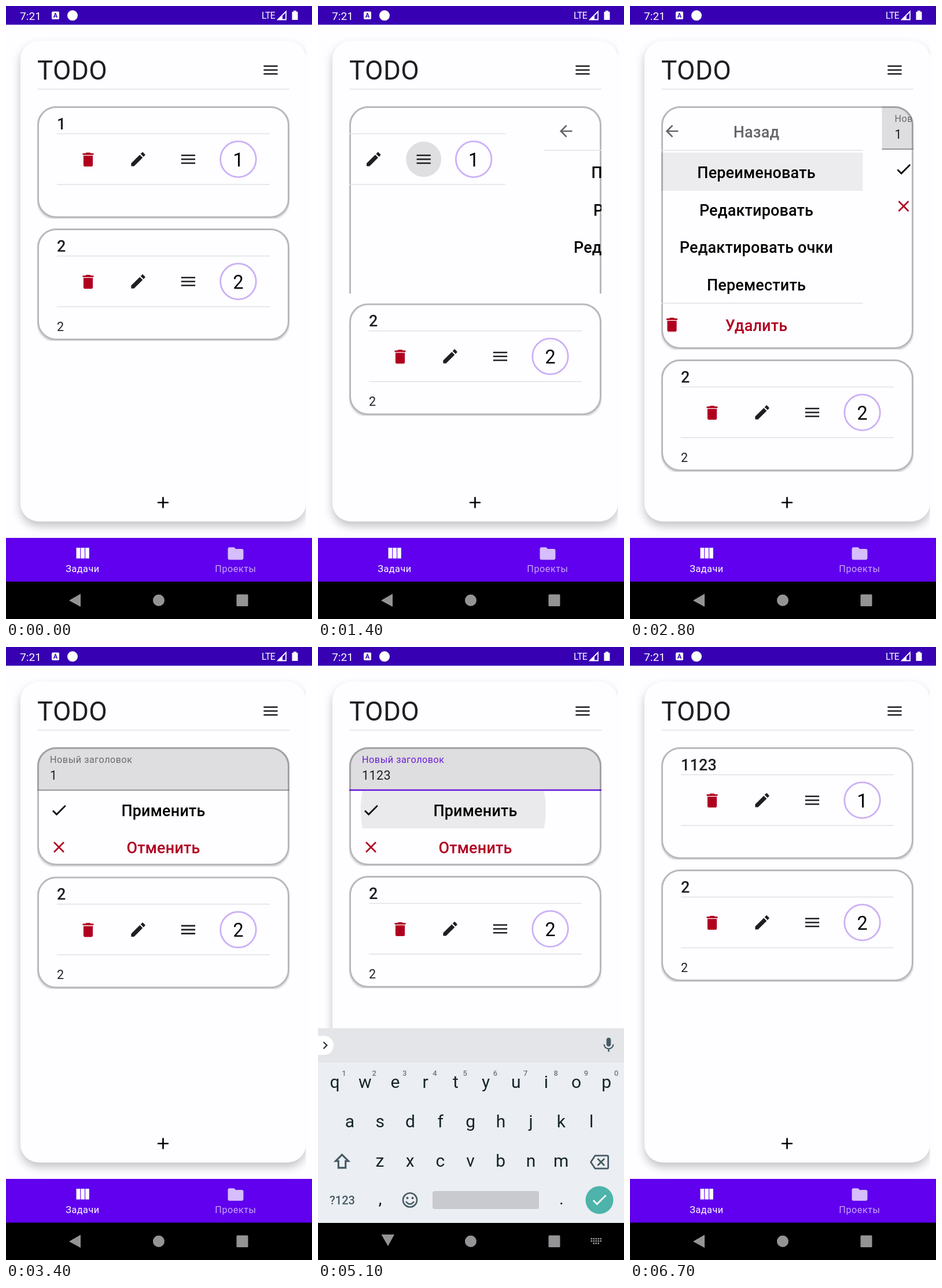
These frames come from a looping animation (529x1058 px, 6800 ms). An HTML page:

```html
<!DOCTYPE html>
<html lang="ru">
<head>
<meta charset="utf-8">
<title>TODO</title>
<style>
html, body { margin: 0; width: 100%; height: 100%; overflow: hidden; background: #fefdff; }
svg { display: block; width: 100vw; height: 100vh; font-family: Roboto, sans-serif; }
.mid { text-anchor: middle; }
.btn { font-size: 26.9px; font-weight: 500; letter-spacing: .2px; text-anchor: middle; }
.ink { fill: #1f1e20; }
.red { fill: #b00020; }
.line { stroke: #e1e0e3; stroke-width: 1.5; }
</style>
</head>
<body>
<svg id="stage" viewBox="0 0 529 1058"></svg>
<script>
const PAGE = 435, MAIN = 193, MENU = 419, EDIT = 204;
const OPEN = 1318, RENAME = 2743, FOCUS = 3750, APPLY = 5630, SLIDE = 300, LOOP = 6800;
const TYPED = [4400, 4500, 4590];

const ICONS = {
  trash: 'M6 19c0 1.1.9 2 2 2h8c1.1 0 2-.9 2-2V7H6v12zM19 4h-3.5l-1-1h-5l-1 1H5v2h14V4z',
  pen: 'M3 17.25V21h3.75L17.81 9.94l-3.75-3.75L3 17.25zM20.71 7.04c.39-.39.39-1.02 0-1.41l-2.34-2.34c-.39-.39-1.02-.39-1.41 0l-1.83 1.83 3.75 3.75 1.83-1.83z',
  menu: 'M3 18h18v-2H3v2zm0-5h18v-2H3v2zm0-7v2h18V6H3z',
  plus: 'M19 13h-6v6h-2v-6H5v-2h6V5h2v6h6v2z',
  back: 'M20 11H7.83l5.59-5.59L12 4l-8 8 8 8 1.41-1.41L7.83 13H20v-2z',
  check: 'M9 16.17L4.83 12l-1.42 1.41L9 19 21 7l-1.41-1.41z',
  cross: 'M19 6.41L17.59 5 12 10.59 6.41 5 5 6.41 10.59 12 5 17.59 6.41 19 12 13.41 17.59 19 19 17.59 13.41 12z',
  folder: 'M10 4H4c-1.1 0-2 .9-2 2v12c0 1.1.9 2 2 2h16c1.1 0 2-.9 2-2V8c0-1.1-.9-2-2-2h-8l-2-2z',
  mic: 'M12 14c1.66 0 3-1.34 3-3V5c0-1.66-1.34-3-3-3S9 3.34 9 5v6c0 1.66 1.34 3 3 3zM17.3 11c0 3-2.54 5.1-5.3 5.1S6.7 14 6.7 11H5c0 3.41 2.72 6.23 6 6.72V21h2v-3.28c3.28-.48 6-3.3 6-6.72h-1.7z',
  chevron: 'M8.6 16.6L13.2 12 8.6 7.4 10 6l6 6-6 6z',
  erase: 'M22 3H7c-.7 0-1.2.4-1.6.9L0 12l5.4 8.1c.4.5.9.9 1.6.9h15c1.1 0 2-.9 2-2V5c0-1.1-.9-2-2-2zm0 16H7.1l-4.7-7 4.7-7H22v14zM10.4 17l3.6-3.6 3.6 3.6 1.4-1.4-3.6-3.6L19 8.4 17.6 7 14 10.6 10.4 7 9 8.4l3.6 3.6L9 15.6z',
  shift: 'M12 3L2.5 12.5H7V20h10v-7.500h4.5zM12 5.800l4.700 4.700H15V18H9v-7.500H7.300z'
};

const icon = (name, x, y, fill = '#1f1e20', k = 1.347) =>
  `<path d="${ICONS[name]}" fill="${fill}" fill-rule="evenodd" transform="translate(${x} ${y}) scale(${k}) translate(-12 -12)"/>`;
const text = (s, x, y, size, attrs = '') => `<text x="${x}" y="${y}" font-size="${size}" ${attrs}>${s}</text>`;
const btn = (s, y, fill = '#000') => `<text class="btn" x="272" y="${y}" fill="${fill}">${s}</text>`;
const line = (y, x1 = 88, x2 = 456) => `<path class="line" d="M${x1} ${y}H${x2}"/>`;
const rect = (x, y, w, h, attrs) => `<rect x="${x}" y="${y}" width="${w}" height="${h}" ${attrs}/>`;

const frame = (id, h) =>
  rect(55.5, 177, 433, h - 3, `rx="31" fill="none" stroke="#000" stroke-opacity=".2" stroke-width="3" filter="url(#soft)" id="${id}Shade"`) +
  rect(55.5, 174.5, 433, h - 3, `rx="31" fill="#fefdff" stroke="#b9b8bb" stroke-width="3" id="${id}Edge"`);

const task = (id, title, points, note) =>
  text(title, 88, 212.5, 26.9, `id="${id}Title" class="ink" font-weight="500" letter-spacing=".2"`) +
  line(220.5) + line(308) +
  icon('trash', 142, 265, '#b00020') + icon('pen', 228.5, 264.5) + icon('menu', 315, 264.5) +
  '<circle cx="401.5" cy="264.5" r="30.800" fill="none" stroke="#cbb1f6" stroke-width="2.8"/>' +
  text(points, 401.5, 277, 32.3, 'class="mid"') + text(note, 88, 350, 21.5, 'class="ink"');

const menuPage = () =>
  `<g clip-path="url(#itemClip)"><circle id="itemRipple" cy="286"/></g>` +
  icon('back', 126, 216, '#666567') + btn('Назад', 226.5, '#666567') + line(249) +
  ['Переименовать', 'Редактировать', 'Редактировать очки', 'Переместить']
    .map((s, i) => btn(s, 297 + i * 64.7)).join('') +
  line(513) + icon('trash', 126, 550, '#b00020') + btn('Удалить', 561, '#b00020');

const editPage = () =>
  `<g clip-path="url(#applyClip)"><circle id="applyRipple" cy="281"/></g>` +
  rect(54, 173, 436, 75, 'fill="#000" fill-opacity=".125"') +
  '<path id="underline" d="M54 247H490"/>' +
  text('Новый заголовок', 76, 200, 16.2, 'id="label" letter-spacing=".54"') +
  text('1', 76, 228.5, 21.5, 'id="value" class="ink" letter-spacing=".4"') +
  rect(0, 206, 2.7, 29, 'id="caret" fill="#6200ee"') +
  icon('check', 91.6, 281.5, '#000') + btn('Применить', 291.5) +
  icon('cross', 91.5, 345.5, '#b00020') + btn('Отменить', 356, '#b00020');

function keyboard() {
  const row = (keys, x, y) => [...keys].map((c, i) => text(c, x + i * 52.2, y, 30, 'class="mid"')).join('');
  const digits = [...'1234567890'].map((c, i) =>
    text(c, 45 + i * 52.3, 740, 13, 'class="mid" font-weight="500" fill="#6d777d"')).join('');
  const dark = '#455a64';
  return rect(0, 658, 529, 336, 'fill="#ebeef2"') + rect(0, 658, 529, 59, 'fill="#e3e5e8"') +
    rect(-20, 671, 47, 33, 'rx="16.5" fill="#fff"') + icon('chevron', 12.5, 687.5, '#263238', 1.1) +
    icon('mic', 502.5, 687, dark, 1.28) +
    `<g fill="#15232a">${row('qwertyuiop', 29, 761)}${row('asdfghjkl', 55, 829)}${row('zxcvbnm', 107, 897)}</g>` + digits +
    icon('shift', 41.5, 888, dark, 1.55) + icon('erase', 486.5, 889, dark, 1.38) +
    text('?123', 42, 962, 20, `class="mid" fill="${dark}" font-weight="500"`) +
    text(',', 107.5, 962, 28, 'class="mid"') + text('.', 421, 962, 28, 'class="mid"') +
    `<g fill="none" stroke="${dark}" stroke-width="2.6"><circle cx="159" cy="954.500" r="12"/><path d="M152 957q7 9 14 0"/></g>
     <g fill="${dark}"><circle cx="154.500" cy="951" r="2"/><circle cx="163.500" cy="951" r="2"/></g>` +
    rect(198, 939, 184, 31, 'rx="4" fill="#c8cacf"') +
    '<circle cx="486.500" cy="954.500" r="24" fill="#4db3ab"/>' + icon('check', 486.5, 954, '#fff');
}

const statusBar = () => rect(0, 0, 529, 32.3, 'fill="#3700b3"') +
  `<g fill="#fff">${text('7:21', 24, 23.500, 19.2)}${rect(79, 9.5, 13, 13.5, 'rx="2"')}<circle cx="115" cy="16.300" r="9"/>
   ${text('LTE', 442, 22, 15.8, 'letter-spacing="-.5"')}
   <path d="M470 23.500L484 9.500V23.500Z" fill="none" stroke="#fff" stroke-width="1.8"/><path d="M469 24l9-9v9z"/>
   <path d="M497 8h5v2h2.500v14h-10v-14h2.500z"/></g>` +
  text('A', 85.5, 20.300, 11, 'class="mid" font-weight="700" fill="#3700b3"');

const tabs = () => rect(0, 918, 529, 76, 'fill="#6000ee"') +
  [121.5, 129.3, 137.1].map(x => rect(x, 935, 6.7, 18.5, 'fill="#fff"')).join('') +
  text('Задачи', 132.500, 977, 16.2, 'class="mid" fill="#fff" letter-spacing=".54"') +
  icon('folder', 397, 945, '#d6bdfb') +
  text('Проекты', 397, 977, 16.2, 'class="mid" fill="#c9a6f8" letter-spacing=".54"');

const keyDots = () => [0, 1, 2].map(r => [0, 1, 2, 3, 4].map(c =>
  r == 2 && (c == 0 || c == 4) ? '' : rect(471.5 + c * 4, 1020 + r * 4, 2.6, 2.6, '')).join('')).join('');

const sysBar = () => `<g fill="#949396">
  <path id="navBack" d="M-11.500 .5L8.500 -11V11.500Z"/>
  <circle cx="264" cy="1025.700" r="10"/>${rect(398.5, 1015.5, 20, 20.5, 'rx="1.5"')}
  <g id="navKeys">${keyDots()}</g></g>`;

const box = (id, x, y, w, h, attrs = '') => `<clipPath id="${id}">${rect(x, y, w, h, attrs)}</clipPath>`;

document.getElementById('stage').innerHTML = `
<defs>
  ${box('boardClip', 11, 32, 507.500, 886)}
  ${box('sizeClip', 54, 173, 436, MAIN, 'id="sizeBox"')}
  ${box('bodyClip', 54, 173, 436, MAIN, 'id="bodyBox" rx="32"')}
  ${box('plainClip', 54, 173, 436, MAIN + 1)}
  ${box('itemClip', 88, 253, 368, 66)}
  ${box('applyClip', 67, 249, 410, 64)}
  <filter id="soft" x="-10%" y="-10%" width="120%" height="120%"><feGaussianBlur stdDeviation="1.500"/></filter>
  <filter id="lift" x="-10%" y="-10%" width="120%" height="120%">
    <feDropShadow dx="0" dy="8" stdDeviation="8" flood-color="#000" flood-opacity=".24"/></filter>
</defs>
${rect(0, 0, 529, 1058, 'fill="#fefdff"')}
<g clip-path="url(#boardClip)">${rect(25, 60.5, 493.5, 829, 'rx="32" fill="#fefdff" filter="url(#lift)"')}</g>
${text('TODO', 54, 127, 45.8, 'class="ink" letter-spacing=".34"')}
${icon('menu', 457.5, 110.5)}${line(143.500, 54, 490)}
<g clip-path="url(#sizeClip)">${frame('card', MAIN)}
  <g clip-path="url(#bodyClip)">
    <g id="main"><circle id="iconRipple" cx="315" cy="264.500"/>${task('first', '1', '1', '')}</g>
    <g id="menu">${menuPage()}</g>
    <g id="edit">${editPage()}</g>
  </g>
</g>
<g id="second"><g clip-path="url(#plainClip)">${frame('other', MAIN)}</g>${task('other', '2', '2', '2')}</g>
<path id="handle" d="M89 235L98.900 244.100A14 14 0 1 1 79.100 244.100Z" fill="#6200ee"/>
${icon('plus', 271.5, 857, '#000')}
${tabs()}${rect(0, 993.5, 529, 65, 'fill="#000"')}
<g id="keyboard">${keyboard()}</g>
${sysBar()}${statusBar()}`;

const $ = id => document.getElementById(id);
const set = (id, attrs) => { for (const k in attrs) $(id).setAttribute(k, attrs[k]); };
const show = (id, on) => set(id, { visibility: on ? 'visible' : 'hidden' });
const ramp = (t, start, len) => Math.min(1, Math.max(0, (t - start) / len));

// cubic-bezier(.4, 0, .2, 1)
function ease(x) {
  let lo = 0, hi = 1;
  for (let i = 0; i < 20; i++) {
    const m = (lo + hi) / 2, n = 1 - m;
    if (1.2 * n * n * m + .6 * n * m * m + m * m * m < x) lo = m; else hi = m;
  }
  return lo * lo * (3 - 2 * lo);
}

// critically damped spring
function spring(t, start) {
  const w = Math.max(0, t - start) / 50;
  return 1 - (1 + w) * Math.exp(-w);
}

function page(id, x, on) {
  show(id, on);
  set(id, { transform: `translate(${x} 0)` });
}

function ripple(id, t, start, end, alpha, r0, r1, x0, x1) {
  const e = ease(ramp(t, start, 225));
  const a = alpha * ramp(t, start, 75) * (1 - ramp(t, end, 150));
  set(id, { r: r0 + (r1 - r0) * e, cx: x0 + (x1 - x0) * e, 'fill-opacity': a });
}

function draw(t) {
  const opened = ease(ramp(t, OPEN, SLIDE)), renamed = ease(ramp(t, RENAME, SLIDE)), applied = ease(ramp(t, APPLY, SLIDE));
  const inMain = t < OPEN + SLIDE || t >= APPLY;
  const inMenu = t >= OPEN - 13 && t < RENAME + SLIDE;
  const inEdit = t >= RENAME && t < APPLY + SLIDE;
  page('main', PAGE * (applied - opened), inMain);
  page('menu', PAGE * (1 - opened - renamed), inMenu);
  page('edit', PAGE * (1 - renamed + applied), inEdit);
  $('firstTitle').textContent = t < APPLY ? '1' : '1123';

  const body = inMenu ? MENU : inEdit ? EDIT : MAIN;
  const size = MAIN + (MENU - MAIN) * spring(t, OPEN - 13) - (MENU - EDIT) * spring(t, RENAME + SLIDE)
    - (EDIT - MAIN) * spring(t, APPLY + SLIDE + 5);
  set('sizeBox', { height: size + 1 });
  set('bodyBox', { height: body });
  set('cardEdge', { height: body - 3 });
  set('cardShade', { height: body - 3 });
  set('second', { transform: `translate(0 ${size + 18})` });

  ripple('iconRipple', t, 1180, OPEN + 90, .12, 18, 30.5, 315, 315);
  ripple('itemRipple', t, 2560, RENAME + 70, .07, 110, 200, 240, 272);
  ripple('applyRipple', t, 5025, APPLY, .08, 110, 217, 200, 272);

  const focus = t >= FOCUS && t < APPLY + SLIDE;
  const typed = TYPED.filter(k => t >= k).length;
  const since = typed ? t - TYPED[typed - 1] : t - FOCUS;
  $('value').textContent = '1123'.slice(0, typed + 1);
  set('label', { fill: focus ? '#6a1fd8' : '#6c6b6e' });
  set('underline', { stroke: focus ? '#6016d8' : '#7f7e82', 'stroke-width': focus ? 2.7 : 1.4 });
  set('caret', { x: 87.6 + typed * 12.4, 'fill-opacity': focus && t < APPLY && since % 1000 < 500 ? 1 : 0 });
  show('handle', focus && !typed);

  const away = t < 5000 ? (1 - ramp(t, 3850, 200)) ** 2 : ramp(t, 5945, 150) ** 1.8;
  set('keyboard', { transform: `translate(0 ${33 * away})`, opacity: 1 - away ** 1.2 });
  show('keyboard', away < 1);
  const turn = t < 5000 ? ease(ramp(t, 3800, 200)) : 1 - ease(ramp(t, 5950, 250));
  set('navBack', { transform: `translate(120.5 ${1025.5 - 3 * turn}) rotate(${-90 * turn})` });
  show('navKeys', t >= 3880 && t < 5950);
}

function tick() {
  draw(performance.now() % LOOP);
  requestAnimationFrame(tick);
}
tick();
</script>
</body>
</html>
```
